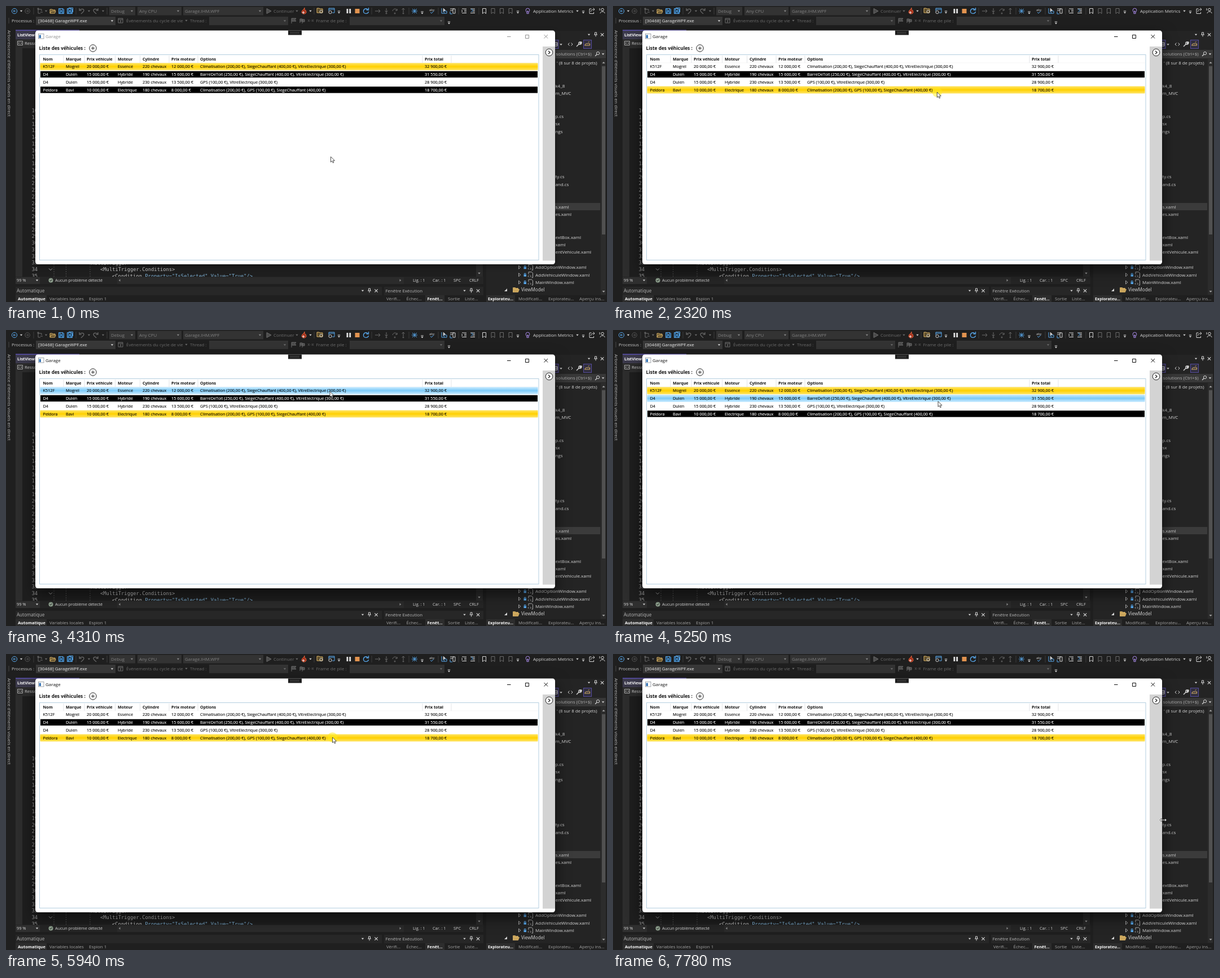
An HTML page that plays this animation: 1065x526 px, repeating every 8000 ms.

```html
<!DOCTYPE html>
<html lang="fr">
<head>
<meta charset="utf-8">
<title>Garage</title>
<style>
html, body { margin: 0; width: 100%; height: 100%; overflow: hidden; background: #1f1f1f; }
svg { display: block; width: 1065px; height: 526px; }
text { font-family: "Open Sans", "Noto Sans", sans-serif; white-space: pre; }
.code { font-family: "DejaVu Sans Mono", "Noto Sans Mono", monospace; }
#frame { fill: #fff; filter: drop-shadow(0 3px 5px rgba(0,0,0,.4)); }
.active #frame { filter: drop-shadow(0 9px 13px rgba(0,0,0,.6)); }
#title { fill: #919191; }
#buttons { stroke: #929292; fill: none; }
.active #title { fill: #111; }
.active #buttons { stroke: #111; }
.row rect { fill: none; }
.row text { fill: #0c0c0c; stroke: #0c0c0c; stroke-width: .12; }
.row .bar { visibility: hidden; }
.row.alt .bar { visibility: visible; fill: #000; }
.row.alt text { fill: #fff; stroke: #fff; }
.row.hover .glow { fill: url(#blue); }
.row.sel .glow { fill: url(#gold); }
#expander circle { fill: #fff; stroke: #222; }
#expander path { fill: none; stroke: #222; stroke-width: 1.3; }
#expander.hover circle { fill: #f3f9ff; stroke: #5593ff; }
#expander.hover path { stroke: #3b7be8; }
</style>
</head>
<body>
<svg id="stage" viewBox="0 0 1065 526" xmlns="http://www.w3.org/2000/svg"></svg>
<script>
const stage = document.getElementById('stage');
const out = [];
const LIGHT = '#d6d6d6', DIM = '#6c6c6c', BLUE = '#58a8ec', SAND = '#dcb567';

// Drawing helpers; text is placed by the middle of its line.
const esc = s => s.replace(/&/g, '&amp;').replace(/</g, '&lt;');
const add = s => out.push(s);
const text = (x, y, s, fill = LIGHT, size = 7.9, more = '') =>
  add(`<text x="${x}" y="${y + size * .35}" font-size="${size}" fill="${fill}" ${more}>${esc(s)}</text>`);
const rect = (x, y, w, h, fill, more = '') =>
  add(`<rect x="${x}" y="${y}" width="${w}" height="${h}" fill="${fill}" ${more}/>`);
const path = (x, y, d, stroke = LIGHT, fill = 'none', w = 1, more = '') =>
  add(`<path transform="translate(${x} ${y})" d="${d}" stroke="${stroke}" fill="${fill}" stroke-width="${w}" ${more}/>`);
const ring = (x, y, r, stroke, fill = 'none', w = 1) =>
  add(`<circle cx="${x}" cy="${y}" r="${r}" stroke="${stroke}" fill="${fill}" stroke-width="${w}"/>`);
const tri = (x, y, c = LIGHT) => path(x, y, 'M-2.2-1.2H2.2L0 1.4Z', 'none', c);
const overflow = (x, y) => { path(x, y - 2, 'M-2.2 0H2.2'); tri(x, y + 1); };
const sep = x => path(x, 9, 'M0-6V6', '#3d3d3d');
const cross = (x, y, c = LIGHT) => path(x, y, 'M-2.7-2.7 2.7 2.7M2.7-2.7-2.7 2.7', c, 'none', 1.1);
const pin = (x, y) => path(x, y, 'M-1.5-3.5V.5M1.5-3.5V.5M-1.5-3.5H1.5M-3 .5H3M0 .5V4');
const bold = 'font-weight="700"';

function mainToolbar() {
  ring(15, 9, 4.6, BLUE);
  path(15, 9, 'M2.5 0H-2M0-2-2 0 0 2', BLUE);
  tri(27, 9);
  ring(38, 9, 4.3, '#555');
  path(38, 9, 'M-2.5 0H2M0-2 2 0 0 2', '#555');
  sep(49);
  path(60, 9, 'M-3-3H3V0M-3-3V4H1M-5-4H-1M-3-6V-2M1 2H5', DIM);
  tri(71, 9, DIM);
  path(83, 9, 'M-5 4V-3H-1L0-2H4V0M-5 4-3 0H5L3.5 4Z', SAND, '#5d4d2c');
  for (const x of [98, 113]) {
    path(x, 9, 'M-4.5-4.5H3L4.5-3V4.5H-4.5ZM-2-4V-1H2V-4M-2.5 4V1H2.5V4', BLUE, '#1d4566');
  }
  path(113, 9, 'M-2-5.8H5.5V2', BLUE);
  sep(124);
  path(134, 9, 'M-4-5V-1H0M-4-1C-1-5 4-4 4-1 4 2 0 3-1 5', DIM, 'none', 1.2);
  tri(147, 9, DIM);
  path(159, 9, 'M4-5V-1H0M4-1C1-5-4-4-4-1-4 2 0 3 1 5', DIM, 'none', 1.2);
  tri(172, 9, DIM);
  sep(179);
  for (const [x, w, s] of [[183, 46, 'Debug'], [233, 78, 'Any CPU'], [314, 142, 'Garage.IHM.WPF']]) {
    rect(x, 1.5, w, 15, '#333');
    text(x + 3, 9, s, '#808080');
    tri(x + w - 6, 9, '#8a8a8a');
  }
  path(466, 9, 'M-4-4.5 4 0-4 4.5Z', DIM, '#4a4a4a');
  text(474, 9, 'Continuer', DIM);
  tri(515.5, 9, DIM);
  path(528, 9, 'M1-6C1-3-4-2-4 2-4 6 4 6 4 2 4 0 3-1 3-2 2-1 1-1 1-6Z', '#e0603a', '#a8341e');
  path(527, 11, 'M0 3V-1M-2 1 0-1 2 1', '#fff');
  tri(539.5, 9);
  sep(546);
  path(556, 8, 'M-5 4V-4H-1L0-3H5V4Z', SAND, '#5d4d2c');
  ring(558.5, 10, 2.5, LIGHT);
  path(577, 9, 'M-5 0V-5H5V3H1M-5-3H5', BLUE);
  ring(574.5, 11, 2.6, LIGHT);
  overflow(590, 11);
  rect(603.5, 5, 2.8, 8, '#e2e2e2');
  rect(608.3, 5, 2.8, 8, '#e2e2e2');
  rect(618.5, 5, 8, 8, '#e2934f');
  path(638, 9, 'M3-3C-1-6-5-3-4.5 1-4 5 3 6 4.5 1M4.5-6V-2H.5', BLUE, 'none', 1.3);
  sep(648);
  path(659, 9, 'M-5 0H4M1-3 4 0 1 3', DIM);
  path(674, 9, 'M0-5V2M-2.5-.5 0 2 2.5-.5', DIM);
  path(689, 9, 'M-4 0C-3-5 3-5 4-1M4-4V-1H1', DIM);
  path(704, 9, 'M0 2V-5M-2.5-2.5 0-5 2.5-2.5', DIM);
  for (const x of [674, 689, 704]) ring(x, 13, 1, DIM);
  sep(714);
  path(724, 9, 'M-4-4 0 0-4 4M4-4 0 0 4 4M0-4V4M-5 0H5', BLUE);
  overflow(737.5, 12);
  text(750, 6.5, 'abc', LIGHT, 6);
  path(755, 12, 'M-3-1-1 1 3-3', BLUE);
  sep(766);
  path(776, 9, 'M-4-5V4H1M-1 0H5V4H1Z', BLUE);
  path(775, 4, 'M0 0V6L2 4 4 4Z', LIGHT, LIGHT, .5);
  path(792, 9, 'M-5-4H2M-5-1H0M0-4V4H4V-4Z', LIGHT);
  path(789, 11, 'M-2-1V3H2', BLUE);
  sep(802);
  path(812, 9, 'M-4-4H4M0-1.5H4M0 1H4M-4 3.5H4M-5-2-3 0-5 2', LIGHT);
  path(827, 9, 'M-4-4H4M0-1.5H4M0 1H4M-4 3.5H4', LIGHT);
  path(824, 9, 'M0-3C5-4 4 1 0 1', BLUE);
  sep(838);
  [847.5, 863, 878.5, 894].forEach((x, i) => path(x, 9, 'M-3-4.5H3V4.5L0 2-3 4.5Z', i ? DIM : LIGHT));
  overflow(907, 11);
  ring(924.5, 7.5, 3.4, '#a98bea');
  path(924.5, 12, 'M-1.6-1V1.5H1.6V-1M0-1V-4', '#a98bea');
  text(934, 9, 'Application Metrics', LIGHT, 8);
  tri(1012.5, 9);
  overflow(1023, 11);
  path(1038.5, 9, 'M-1-4H-4.5V4.5H3V2M-2 1C-2-2 1-3 4-3M2-5.5 4.5-3 2-.5');
  ring(1057, 6.5, 2.3, LIGHT);
  path(1057, 13, 'M-4 0C-4-4 4-4 4 0M-5-9V-5');
}

function debugToolbar() {
  path(5, 26, 'M0-5V5', '#4a4a4a');
  text(10, 26, 'Processus :', '#c8c8c8', 7.7);
  rect(53, 19, 141, 15, '#383838');
  text(57, 26, '[30468] GarageWPF.exe', '#f2f2f2');
  tri(188, 26.5);
  path(203, 26, 'M-4-4H4V4H-4ZM-4-2H4M1-1-1 1H1L-1 4', DIM);
  text(213, 26, 'Événements du cycle de vie', DIM);
  tri(319.5, 26, DIM);
  text(326, 26, 'Thread :', DIM, 7.7);
  rect(360, 19, 140, 15, '#333');
  tri(494, 26.5, DIM);
  path(510, 26, 'M-4 5V-4H4L2-1.5 4 1H-4', DIM, '#4a4a4a');
  path(525, 26, 'M-4 4V-3H0V1H-4M0 5V-2H4V2H0', DIM, '#4a4a4a');
  path(540, 26, 'M-5-2-2 2M-2-2-5 2M0 0H1M2-2 5 2M5-2 2 2', '#555');
  text(549.5, 26, 'Frame de pile :', DIM);
  rect(609, 19, 168, 15, '#333');
  tri(771, 26.5, DIM);
  overflow(785, 30);
}

function editor() {
  text(0, 0, "Arborescence d'éléments visuels en direct", '#b5b5b5', 7.9, 'transform="translate(5.5 43) rotate(90)"');
  rect(17, 44, 829, 450, '#1e1e1e');
  rect(17, 43, 113, 16, '#3c3a4c');
  rect(17, 42.5, 113, 1.3, '#6357c4');
  text(20, 51, 'ListViewItem', '#fff', 7.4, bold);
  rect(17, 59, 829, 16, '#2c2c2c');
  path(25, 66, 'M-4.5-3.5H4.5V3.5H-4.5ZM-1-1.5-3 0-1 1.5M1-1.5 3 0 1 1.5', '#bcbcbc', 'none', .9);
  text(33, 66, 'Ressources', LIGHT, 7.7);
  rect(17, 75, 12, 406, '#2d2d2d');
  add('<clipPath id="code"><rect x="17" y="75" width="816" height="406"/></clipPath><g clip-path="url(#code)">');
  const mono = 'class="code"';
  for (let n = 10; n < 36; n++) text(45.5, 186 + (n - 10) * 11.75, String(n), '#9a9a9a', 8.8, mono);
  for (const x of [85, 106.5, 149]) path(x, 459, 'M0 0V24', '#5a5a5a', 'none', .8, 'stroke-dasharray="2 2"');
  path(79, 468, 'M-3-1.5 0 1.5 3-1.5', '#a8a8a8');
  text(146, 456.5, '<MultiTrigger>', '#c4c4c4', 8.8, mono);
  text(167, 468.3, '<MultiTrigger.Conditions>', '#c4c4c4', 8.8, mono);
  text(188, 480, '<Condition', '#c4c4c4', 8.8, mono);
  text(246.3, 480, 'Property="IsSelected" Value="True"/>', '#7fb2d6', 8.8, mono);
  add('</g>');
  rect(833, 75, 12, 406, '#2a2a2a');
  tri(838.5, 475, '#a0a0a0');
  rect(17, 481, 829, 13, '#252525');
  rect(17, 482, 43, 12, '#303030');
  text(19, 487.5, '99 %', LIGHT, 7.4);
  tri(55, 487.5);
  ring(79.5, 487.5, 4, 'none', '#8d9f8d');
  path(79.5, 487.5, 'M-2 0-.5 1.5 2-1.5', '#1f1f1f');
  text(87, 487.5, 'Aucun problème détecté', LIGHT, 7.35);
  rect(197, 482, 508, 12, '#2b2b2b');
  path(201, 487.5, 'M1.5-2.2V2.2L-1.3 0Z', 'none', '#8a8a8a');
  path(699, 487.5, 'M-1.5-2.2V2.2L1.3 0Z', 'none', '#8a8a8a');
  [[721, 'Lig. : 1'], [756, 'Car. : 1'], [793, 'SPC'], [821, 'CRLF']].forEach(([x, s]) => text(x, 487.5, s, LIGHT, 7.3));
}

function bottomPanels() {
  rect(17, 499, 649, 15, '#272727');
  rect(670, 499, 176, 15, '#272727');
  text(19, 506, 'Automatique', '#b8b8b8', 8.1);
  text(672.5, 506, 'Fenêtre Exécution', '#b8b8b8', 7.85);
  for (const x of [632, 812.5]) {
    tri(x, 506);
    pin(x + 12, 505.5);
    cross(x + 24, 506);
  }
  rect(17, 514, 55, 12, '#2d2d2d');
  rect(743, 514, 34, 12, '#2d2d2d');
  text(21, 520.5, 'Automatique', '#fafafa', 7.4, bold);
  text(746.5, 520.5, 'Fenêt...', '#fafafa', 7.4, bold);
  [[77, 'Variables locales'], [147, 'Espion 1'], [674, 'Vérifi...'], [709.5, 'Échec...'], [783, 'Sortie'], [813, 'Liste...']]
    .forEach(([x, s]) => text(x, 520.5, s, '#a3a3a3'));
}

function explorer() {
  const toggled = 'stroke="#574d9e"';
  rect(851, 44, 212, 470, '#242424');
  tri(1033, 51);
  pin(1045, 50.5);
  cross(1056.5, 51);
  rect(963, 60.5, 16, 15, '#302e3e', toggled);
  path(975, 68, 'M-2-3H2V3H-2M-2 0H2');
  tri(983.5, 68.5);
  path(1000, 68, 'M-1.5-2.5-4 0-1.5 2.5M1.5-2.5 4 0 1.5 2.5');
  path(1015, 68, 'M-4 4 0 0M0 0C-1-4 2-5 4-4L2-2 3-1 5-3C5 0 3 1 0 0', LIGHT, 'none', 1.4);
  rect(1023.5, 60.5, 14, 15, '#302e3e', toggled);
  path(1030.5, 68, 'M-5 2H4V-1H-3ZM1-3 3-5', SAND);
  rect(851, 78, 212, 15, '#383838');
  text(974.5, 85.5, 'solutions (Ctrl+$)', '#b0b0b0', 8);
  ring(1049, 84, 2.6, LIGHT);
  path(1047, 86, 'M0 0-3 3', LIGHT, 'none', 1.3);
  tri(1058, 85.5);
  rect(851, 350, 202, 13, '#3b3b3b');
  text(976, 101, "' (8 sur 8 de projets)", LIGHT, 7.8);
  [[142, 'k4_8'], [155, 'm_MVC'], [196, 'p.cs'], [209, 'sx'], [223, 'ngs'], [303, 'ty.cs'], [317, 'and.cs'], [357, 's.xaml'],
   [370.5, 'es.xaml'], [411, 'extBox.xaml'], [424, 'xaml'], [437.5, 'entVehicule.xaml']]
    .forEach(([y, s]) => text(973.4, y, s, LIGHT, 8));
  ['AddOptionWindow', 'AddVehiculeWindow', 'MainWindow'].forEach((s, i) => {
    const y = 464.3 + i * 13.4;
    path(910, y, 'M-1.5-3V3L2 0Z', '#b0b0b0', 'none', .9);
    rect(917.5, y - .5, 4.5, 3.5, BLUE);
    path(919.7, y, 'M-1.3-.5V-2.5H1.3V-.5', BLUE);
    path(929.5, y, 'M-3.5-1V-5H2L4-3V5H2M-3 1-4.5 2.5-3 4M-.5 1 1 2.5-.5 4', '#b8b8b8', 'none', .9);
    text(938, y, s + '.xaml', LIGHT, 8);
  });
  path(885.5, 504.5, 'M2.5-2.5V2.5H-2.5Z', 'none', LIGHT);
  path(903.5, 504.5, 'M-5 4V-4H-1L0-3H4V-1M-5 4-3-1H6L4 4Z', SAND, '#c9a45a', .8);
  text(913, 504.5, 'ViewModel', LIGHT, 8.1);
  rect(1054, 94, 9, 419, '#2c2c2c');
  rect(1056, 107, 6, 299, '#515151');
  path(1059, 100.5, 'M-2.5 1.5H2.5L0-1.5Z', 'none', '#a0a0a0');
  path(1059, 507.5, 'M-2.5-1.5H2.5L0 1.5Z', 'none', '#a0a0a0');
  rect(851, 514, 51, 12, '#2d2d2d');
  text(854, 520.5, 'Explorateu...', '#fafafa', 7.2, bold);
  [[908, 'Modificati...'], [961, 'Explorateu...'], [1016, 'Aperçu ins...']].forEach(([x, s]) => text(x, 520.5, s, '#a3a3a3', 7.8));
}

const cols = [65.5, 106, 143, 198, 242, 293, 344, 742];
const heads = ['Nom', 'Marque', 'Prix véhicule', 'Moteur', 'Cylindre', 'Prix moteur', 'Options', 'Prix total'];
const data = [
  ['K512F', 'Mogrel', '20 000,00 €', 'Essence', '220 chevaux', '12 000,00 €', 'Climatisation (200,00 €), SiegeChauffant (400,00 €), VitreElectrique (300,00 €)', '32 900,00 €'],
  ['D4', 'Dulen', '15 000,00 €', 'Hybride', '190 chevaux', '15 600,00 €', 'BarreDeToit (250,00 €), SiegeChauffant (400,00 €), VitreElectrique (300,00 €)', '31 550,00 €'],
  ['D4', 'Dulen', '15 000,00 €', 'Hybride', '230 chevaux', '13 500,00 €', 'GPS (100,00 €), VitreElectrique (300,00 €)', '28 900,00 €'],
  ['Peldora', 'Bavi', '10 000,00 €', 'Electrique', '180 chevaux', '8 000,00 €', 'Climatisation (200,00 €), GPS (100,00 €), SiegeChauffant (400,00 €)', '18 700,00 €']
];

function gradient(id, edge, mid) {
  add(`<linearGradient id="${id}" x2="0" y2="1"><stop stop-color="${edge}"/>` +
    `<stop offset=".5" stop-color="${mid}"/><stop offset="1" stop-color="${edge}"/></linearGradient>`);
}

function garage() {
  gradient('gold', '#ffe566', '#ffd000');
  gradient('blue', '#cdecff', '#7ccaf8');
  add('<rect id="frame" x="52" y="43.5" width="921" height="415.5" rx="4.5"/>');
  rect(500, 43.5, 24, 8, '#1d1d1d');
  path(512, 47.5, 'M-8-1H8M-8 1H8', '#777', 'none', .8, 'stroke-dasharray="1 1"');
  rect(57.5, 49.5, 9.5, 8.5, '#fff', 'stroke="#8a8f96" stroke-width=".8"');
  rect(58.5, 51.5, 3.5, 5.5, '#3b78b8');
  add('<text id="title" x="70" y="57" font-size="8">Garage</text>');
  add('<path id="buttons" d="M888 54.5H894.5M920.5 51.5H926.5V57.5H920.5ZM953.5 51 960 57.5M960 51 953.5 57.5"/>');
  text(58.5, 75, 'Liste des véhicules :', '#111', 8.35, bold);
  ring(154, 75, 6.2, '#222');
  path(154, 75, 'M-3 0H3M0-3V3', '#222');
  rect(951, 72, 22, 380.5, '#d3d3d3');
  add('<g id="expander"><circle cx="962.5" cy="82.5" r="6.3"/><path d="M961 79.7 964 82.5 961 85.3"/></g>');
  rect(59.5, 86.5, 884.5, 365, '#fff', 'stroke="#b4cfe0"');
  path(0, 0, 'M60 101H943', '#efefef', 'none', .6);
  for (const x of [102, 139, 193.5, 237.5, 289, 340, 738, 789]) path(x, 88, 'M0 0V13', '#dcdfe3', 'none', .8);
  heads.forEach((s, i) => text(cols[i], 94.5, s, '#111', 7.15, bold));
  data.forEach((cells, i) => {
    const y = 101.2 + i * 13.75;
    add('<g class="row">');
    rect(60.5, y, 882, 13, 'none', 'class="glow" rx="1"');
    rect(61, y + .8, 881, 11.4, 'none', 'class="bar"');
    cells.forEach((s, c) => text(cols[c], y + 6.6, s, '', 7.3));
    add('</g>');
  });
}

function pointers() {
  add('<circle id="halo" r="8.8" fill="#ffec1a" opacity=".5"/>');
  add('<path id="arrow" d="M0 0V9.6L2.2 7.6 3.8 11 5.4 10.3 3.9 7H7Z" fill="#fff" stroke="#222" stroke-width=".8"/>');
  add('<path id="resize" d="M-6 0-3.2-2.8V-.8H3.2V-2.8L6 0 3.2 2.8V.8H-3.2V2.8Z" fill="#fff" stroke="#222" stroke-width=".6"/>');
}

rect(0, 0, 1065, 526, '#1f1f1f');
[mainToolbar, debugToolbar, editor, bottomPanels, explorer, garage, pointers].forEach(draw => draw());
stage.innerHTML = out.join('');

const linear = p => p;
const smooth = p => p * p * (3 - 2 * p);
const easeOut = p => 1 - (1 - p) ** 3;

// start, end, steps, target x, target y, easing
const moves = [
  [670, 1440, 12, 575, 168, smooth],
  [1510, 1780, 5, 575, 155.8, linear],
  [1980, 2050, 2, 574.3, 153, linear],
  [3050, 3300, 4, 574, 125, linear],
  [3760, 4310, 8, 574, 109.3, linear],
  [5120, 5800, 11, 578.5, 148, easeOut],
  [6400, 7180, 12, 962, 298, smooth],
  [7240, 7780, 7, 975, 295, linear]
];
const clicks = [[2320, 2460, 3], [4640, 4770, 0], [5940, 6070, 3]];

function pointerAt(t) {
  let x = 575.5, y = 267.8;
  for (const [start, end, steps, tx, ty, ease] of moves) {
    if (t < start) break;
    const step = Math.min(steps, Math.floor((t - start) / (end - start) * (steps - 1) + 1e-6) + 1);
    const p = ease(step / steps);
    x += (tx - x) * p;
    y += (ty - y) * p;
  }
  return [x, y];
}

const byId = id => document.getElementById(id);
const [halo, arrow, resize, expander] = ['halo', 'arrow', 'resize', 'expander'].map(byId);
const rows = [...document.querySelectorAll('.row')];
const show = (el, on) => el.setAttribute('visibility', on ? 'visible' : 'hidden');

function render(t) {
  const [x, y] = pointerAt(t);
  const onEdge = x > 970;
  const hovered = x < 943 && y < 155.6 ? Math.floor((y - 101.2) / 13.6) : -1;
  let selected = 0, pressed = false;
  for (const [down, up, row] of clicks) {
    if (t >= down) selected = row;
    if (t >= down && t < up) pressed = true;
  }
  stage.classList.toggle('active', t >= clicks[0][0]);
  rows.forEach((row, i) => {
    const state = i === selected ? 'sel' : i === hovered ? 'hover' : i % 2 ? 'alt' : '';
    row.setAttribute('class', 'row ' + state);
  });
  expander.classList.toggle('hover', x >= 951 && !onEdge);
  show(halo, pressed);
  show(arrow, !onEdge);
  show(resize, onEdge);
  for (const el of [halo, arrow, resize]) el.setAttribute('transform', `translate(${x} ${y})`);
}

function tick() {
  render(performance.now() % 8000);
  requestAnimationFrame(tick);
}
tick();
</script>
</body>
</html>
```
